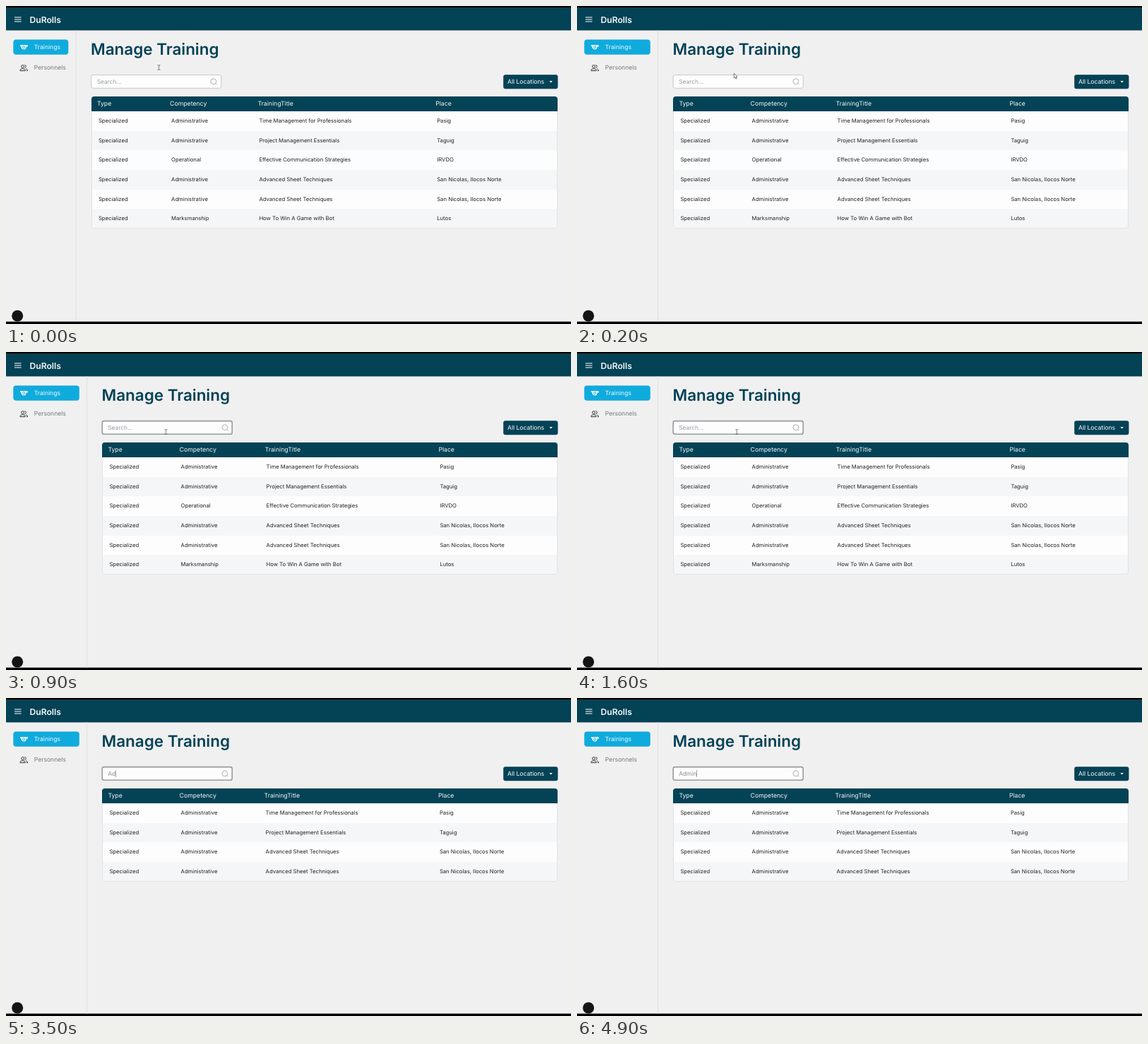
Animation, 800 px wide and 450 px high, one loop 5000 ms. Source, as an HTML page:

```html
<!DOCTYPE html>
<html lang="en">
<head>
<meta charset="utf-8">
<title>Manage Training</title>
<style>
html, body { margin: 0; width: 100%; height: 100%; overflow: hidden; background: #000; }
.stage {
  --e: 15.5px; --s: 0px;
  position: relative; width: 800px; height: 450px; overflow: hidden; background: #000;
  font: 8.6px Inter, "Open Sans", sans-serif; color: #222;
  text-rendering: geometricPrecision; white-space: nowrap;
  animation: layout 5s step-end infinite;
}
.stage * { box-sizing: border-box; }
.stage div, .stage span, .stage svg { position: absolute; }
.edge { x: calc(98.6px + var(--e)); }
.pill { width: calc(78px + var(--e)); }
.box {
  x: calc(120.7px + var(--e)); stroke: #c6c8ca; stroke-width: 1px;
  animation: focus 5s step-end infinite;
}
.brand { left: 33.4px; top: 9.6px; font-size: 12.2px; font-weight: 600; line-height: 20px; color: #f4f7f8; }
.nav { left: 39.7px; line-height: 20px; }
.title { left: calc(120px + var(--e)); top: 47px; font-size: 22.45px; font-weight: 600; line-height: 30px; color: #044256; }
.field {
  left: calc(120.3px + var(--e)); top: 97px; width: 185px; height: 20px;
  font-size: 8.4px; line-height: 20px; color: #8b8e91;
}
.field span { left: 8.4px; top: .6px; }
.hint { color: #9b9ea2; animation: hint 5s step-end infinite; }
.typed::before { content: ""; animation: type 5s step-end infinite; }
.caret {
  display: inline-block; width: .8px; height: 10px; vertical-align: -2px;
  background: #a4a6a8; animation: caret 5s step-end infinite;
}
.pick { left: 710px; top: 97.7px; color: #fff; line-height: 20px; }
.table {
  left: calc(120.6px + var(--e)); right: 18.7px; top: 127.7px;
  border-radius: 4px; overflow: hidden; background: #fdfdfe;
}
.table::after { content: ""; position: absolute; inset: 0; border: 1px solid #e1e2e4; border-top: 0; border-radius: 4px; }
.row { left: 0; right: 0; height: 27.7px; line-height: 27.7px; font-size: 7.7px; }
.row:nth-child(odd) { background: #f5f6f7; }
.row.head { top: 0; height: 21.3px; line-height: 22.8px; font-size: 8.7px; color: #f4f7f8; background: #044256; z-index: 1; }
.row span { margin-left: 2px; }
.row.head span { margin-left: 0; }
/* column offsets from the table's left edge */
.row span:nth-child(1) { left: 8.3px; }
.row span:nth-child(2) { left: calc(111.5px - .13 * var(--e)); }
.row span:nth-child(3) { left: calc(235.8px - .34 * var(--e) + var(--s)); }
.row span:nth-child(4) { left: calc(487.6px - .73 * var(--e) + var(--s) / 2); }
.all { animation: all 5s step-end infinite; }
.some { visibility: hidden; animation: some 5s step-end infinite; }
.pointer { left: 0; top: 0; width: 12px; height: 12px; overflow: visible; animation: move 5s step-end infinite; }
.arrow { visibility: hidden; animation: arrow 5s step-end infinite; }
.beam { animation: beam 5s step-end infinite; }

@keyframes layout {
  0% { --e: 0px; --s: 0px; }
  2% { --e: 15px; --s: 0px; }
  4% { --e: 15.5px; --s: 0px; }
  70%, 100% { --e: 15.5px; --s: -1px; }
}
@keyframes focus {
  0% { stroke: #c6c8ca; stroke-width: 1px; }
  16%, 100% { stroke: #989a9d; stroke-width: 1.6px; }
}
@keyframes hint { 0% { visibility: visible; } 66%, 100% { visibility: hidden; } }
@keyframes type {
  0% { content: ""; }
  66% { content: "A"; }
  70% { content: "Ad"; }
  74% { content: "Adm"; }
  76% { content: "Admi"; }
  78%, 100% { content: "Admin"; }
}
@keyframes caret {
  0%, 88% { visibility: hidden; }
  64%, 98%, 100% { visibility: visible; }
}
@keyframes all { 0% { visibility: visible; } 70%, 100% { visibility: hidden; } }
@keyframes some { 0% { visibility: hidden; } 70%, 100% { visibility: visible; } }
@keyframes move {
  0% { transform: translate(216.5px, 87px); }
  2% { transform: translate(219px, 89px); }
  4% { transform: translate(222px, 95px); }
  6% { transform: translate(224px, 101px); }
  8% { transform: translate(225.5px, 105px); }
  10% { transform: translate(226.2px, 107px); }
  12% { transform: translate(226.2px, 110px); }
  14%, 100% { transform: translate(226.3px, 113px); }
}
@keyframes arrow { 0% { visibility: hidden; } 2% { visibility: visible; } 6%, 100% { visibility: hidden; } }
@keyframes beam {
  0%, 6% { visibility: visible; }
  2%, 66%, 100% { visibility: hidden; }
}
</style>
</head>
<body>
<div class="stage">
  <svg width="800" height="450" style="left:0;top:0" fill="none">
    <rect y="2.8" width="800" height="443.8" fill="#f0f0f0"/>
    <rect y="2.8" width="800" height="31.7" fill="#044256"/>
    <rect class="edge" y="34.5" width="1" height="412.1" fill="#e0e1e2"/>
    <rect class="pill" x="10.3" y="47.4" height="21.4" rx="4" fill="#10abdd"/>
    <rect class="box" y="97.6" width="184" height="18.7" rx="2.6" fill="#fdfdfe"/>
    <rect x="704.2" y="97.3" width="77.2" height="19.9" rx="3" fill="#044256"/>
    <path d="M769.4 106h4.4l-2.2 2.4z" fill="#fff"/>
    <circle cx="16.2" cy="438.5" r="8" fill="#141414"/>
    <path d="M12 16h9.6M12 19h9.6M12 22h9.6" stroke="#fff" stroke-width="1.2"/>
    <path d="M20 55.2h10.8v2.2h-2.2a3.6 3.6 0 1 1-7-.4h-1.6z" fill="#fff"/>
    <circle cx="25.2" cy="58.3" r="1.6" stroke="#10abdd"/>
    <g stroke="#333">
      <circle cx="23.6" cy="85.5" r="1.9"/>
      <path d="M20 91.6v-1.1c0-1 1.8-1.7 3.6-1.7s3.6.7 3.6 1.7v1.1zM26.4 83.6a1.9 1.9 0 0 1 0 3.8M28.1 89c1.5.4 2.4.9 2.4 1.7v.9h-1.6"/>
    </g>
  </svg>
  <span class="brand">DuRolls</span>
  <span class="nav" style="top:48.8px;color:#f2fafd">Trainings</span>
  <span class="nav" style="top:78.2px;color:#77797c">Personnels</span>
  <div class="title">Manage Training</div>
  <div class="field">
    <span class="hint">Search...</span>
    <span class="typed"><i class="caret"></i></span>
    <svg width="12" height="12" style="left:168px;top:4px" fill="none" stroke="#a3a6a9" stroke-width=".9">
      <circle cx="5.8" cy="5.8" r="3.9"/><path d="M8.6 8.6l1.6 1.6"/>
    </svg>
  </div>
  <span class="pick">All Locations</span>
  <div class="table all"></div>
  <div class="table some"></div>
  <svg class="pointer">
    <path class="arrow" d="M.3.3v6.8l1.6-1.4 1.1 2.3 1.1-.5L3 5.2h2z" fill="#fff" stroke="#444" stroke-width=".7"/>
    <path class="beam" d="M-1.8-3.3h1.3l.5.4.5-.4h1.3M-1.8 3.3h1.3l.5-.4.5.4h1.3M0-3v6" fill="none" stroke="#555" stroke-width=".8"/>
  </svg>
</div>
<script>
const head = ["Type", "Competency", "TrainingTitle", "Place"];
const sheet = ["Administrative", "Advanced Sheet Techniques", "San Nicolas, Ilocos Norte"];
const rows = [
  ["Administrative", "Time Management for Professionals", "Pasig"],
  ["Administrative", "Project Management Essentials", "Taguig"],
  ["Operational", "Effective Communication Strategies", "IRVDO"],
  sheet,
  sheet,
  ["Marksmanship", "How To Win A Game with Bot", "Lutos"]
];
const HEAD = 21.3, ROW = 27.7;
const cells = list => list.map(text => `<span>${text}</span>`).join("");

function fill(selector, list) {
  const table = document.querySelector(selector);
  table.style.height = HEAD + ROW * list.length + "px";
  table.innerHTML = `<div class="row head">${cells(head)}</div>` + list.map((row, i) =>
    `<div class="row" style="top:${HEAD + ROW * i}px">${cells(["Specialized", ...row])}</div>`).join("");
}

fill(".all", rows);
fill(".some", rows.filter(row => row[0].startsWith("Admin")));
</script>
</body>
</html>
```
